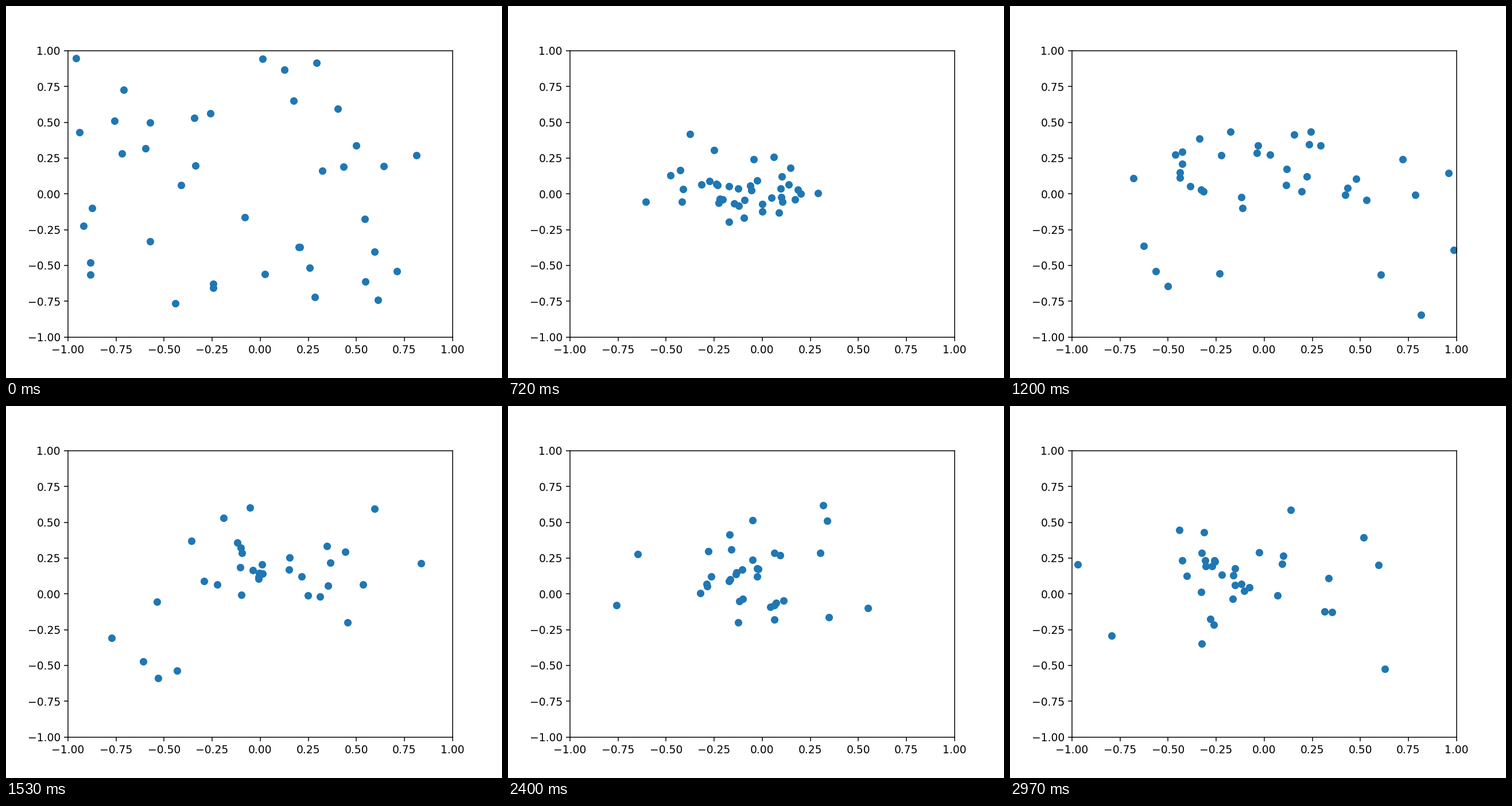
Animation, 864 px wide and 648 px high, one loop 3 s. Source, as a matplotlib script:

```python
import numpy as np
import matplotlib.pyplot as plt
from matplotlib.animation import FuncAnimation

FRAMES, INTERVAL = 100, 30
BODIES, SUBSTEPS = 40, 8
PULL = 0.0024       # gravity of the whole swarm, axis units per frame squared
SOFT = 0.08         # keeps close encounters gentle
DRIFT = 0.45        # how far the core slides right after the collapse


def smooth(n, start, end):
    s = np.clip((n - start) / (end - start), 0, 1)
    return s * s * (3 - 2 * s)


def gravity(p):
    gap = p[None] - p[:, None]
    dist2 = (gap ** 2).sum(axis=2) + SOFT ** 2
    return PULL / BODIES * (gap / dist2[..., None] ** 1.5).sum(axis=1)


def simulate():
    """Leapfrog run of a loose swarm that falls together and bursts apart."""
    rng = np.random.default_rng(3)
    u = rng.random((BODIES, 2))
    p = np.column_stack([1.86 * u[:, 0] ** 1.3 - 0.96, 1.94 * u[:, 1] - 0.94])
    v = rng.normal(0, 0.006, p.shape)
    v -= v.mean(axis=0)
    h = 1 / SUBSTEPS
    a = gravity(p)
    path = [p.copy()]
    for _ in range(FRAMES - 1):
        for _ in range(SUBSTEPS):
            v += a * h / 2
            p += v * h
            a = gravity(p)
            v += a * h / 2
        path.append(p.copy())
    path = np.array(path)
    path[..., 0] += DRIFT * smooth(np.arange(FRAMES), 24, 63)[:, None]
    return path


path = simulate()
fig, ax = plt.subplots(figsize=(6.4, 4.8), dpi=135)
ax.set(xlim=(-1, 1), ylim=(-1, 1))
points, = ax.plot([], [], "o", color="#1f77b4")


def draw(n):
    points.set_data(path[n, :, 0], path[n, :, 1])
    return points,


anim = FuncAnimation(fig, draw, frames=FRAMES, interval=INTERVAL, repeat=True,
                     repeat_delay=0)
plt.show()
```
